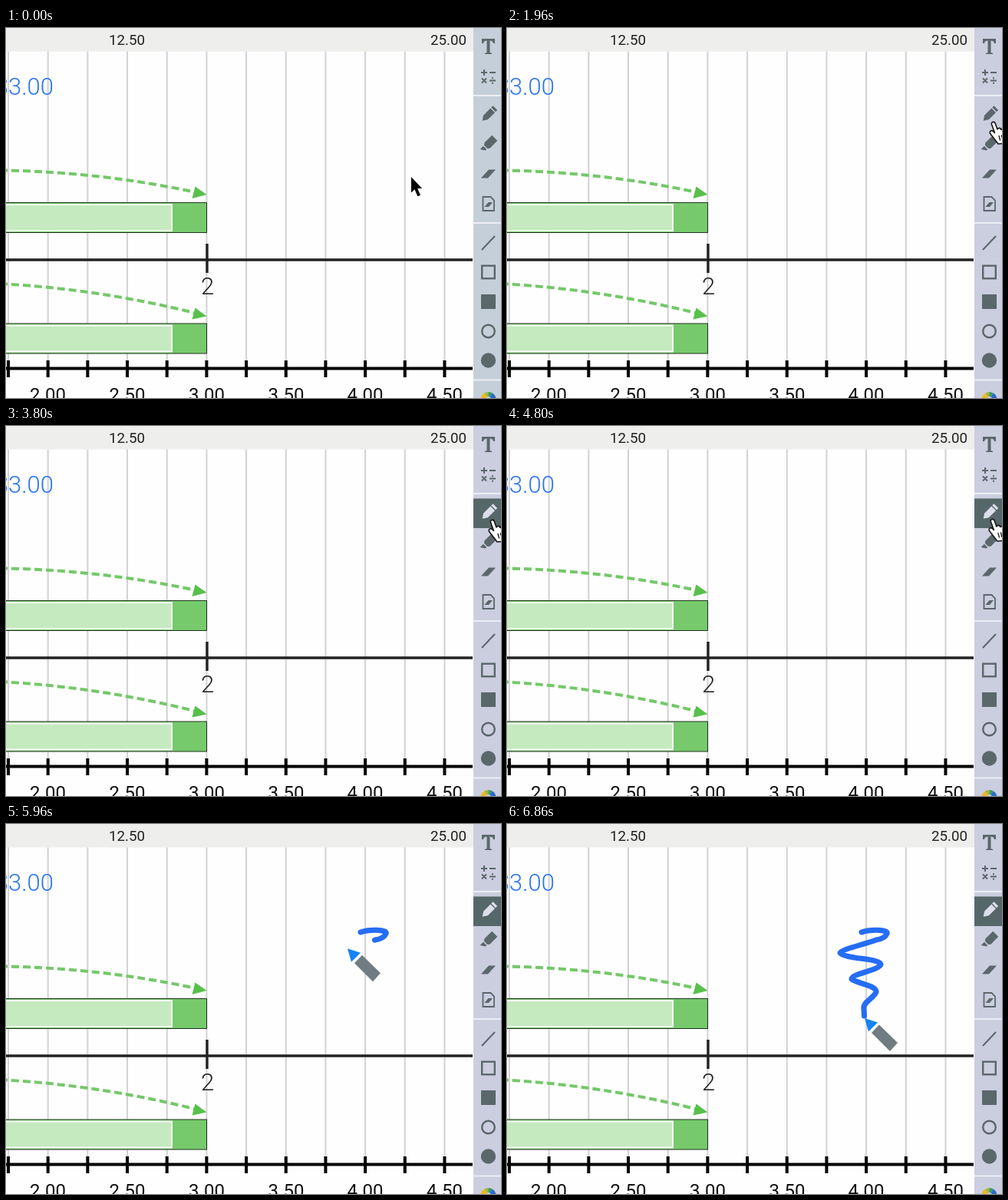
Recreate the animation shown at these times as an HTML page. Size 645 by 482 pixels, loop 8 s.

```html
<!DOCTYPE html>
<html lang="en">
<head>
<meta charset="utf-8">
<title>Number line drawing</title>
<style>
  html, body { margin: 0; width: 100%; height: 100%; overflow: hidden; background: #fefefe; }
  svg { display: block; width: 645px; height: 482px; font-family: Roboto, "Liberation Sans", sans-serif; }
  text { text-anchor: middle; fill: #222; }
  .small { font-size: 18.8px; }
  .axis { font-size: 24px; fill: #111; }
  .big { font-size: 31px; font-weight: 300; }
  .icon { fill: #5a676b; }
  .outline { fill: none; stroke: #5a676b; stroke-width: 2.4; }
  .dash { fill: none; stroke: #74c869; stroke-width: 4; stroke-dasharray: 10 5; }

  /* one 8 s loop: 1% = 80 ms */
  .side, .press, .pencil, .dim, .mover, .arrow, .hand, .approach, .tip, .ink {
    animation: 8s linear infinite;
  }
  .side { animation-name: tint; animation-timing-function: step-end; }
  @keyframes tint { 0% { fill: #c5cfd9; } .75%, 100% { fill: #cbcedf; } }

  .press { animation-name: press; animation-timing-function: step-end; }
  @keyframes press { 0% { opacity: 0; } 30.75%, 100% { opacity: 1; } }

  .pencil { animation-name: light; animation-timing-function: step-end; }
  @keyframes light { 0% { fill: #5a676b; } 30.75%, 100% { fill: #dcdfeb; } }

  .dim { animation-name: dim; animation-timing-function: step-end; }
  @keyframes dim { 0% { opacity: 0; } 30.75% { opacity: .5; } 31.625% { opacity: 1; } 47.5%, 100% { opacity: 0; } }

  .mover { animation-name: move; }
  @keyframes move {
    0% { transform: translate(527px, 192px); }
    12.5% { transform: translate(527px, 192px); animation-timing-function: ease-in-out; }
    24.5%, 58.24% { transform: translate(633px, 123px); }
    58.25%, 60% { transform: translate(632px, 122px); }
    61.25%, 100% { transform: translate(614px, 124px); }
  }
  .arrow { animation-name: arrow; animation-timing-function: step-end; }
  @keyframes arrow { 0% { opacity: 1; } 20.5%, 100% { opacity: 0; } }
  .hand { animation-name: hand; animation-timing-function: step-end; }
  @keyframes hand { 0% { opacity: 0; } 20.5% { opacity: 1; } 61.25%, 100% { opacity: 0; } }

  .approach { animation-name: approach; }
  @keyframes approach {
    0% { transform: translate(170px, -18px); opacity: 0; }
    60% { transform: translate(170px, -18px); opacity: 0; animation-timing-function: cubic-bezier(.4, 0, .7, 1); }
    64.5% { transform: translate(13px, 1px); opacity: 0; animation-timing-function: ease-out; }
    66.25%, 68% { transform: translate(-4px, -1px); opacity: 0; }
    68.5%, 100% { transform: none; opacity: 0; }
  }
  .tip {
    offset-path: path("M462 141C472 137 498 137 495 143C493 148 487 150 481 151C462 158 436 163 434 168C440 176 488 175 487 183C484 191 449 195 449 202C456 208 482 210 481 219C477 228 463 232 465 241L466 253");
    offset-rotate: 0deg;
    animation-name: tip;
  }
  @keyframes tip {
    0%, 68.25% { offset-distance: 0%; }
    74.5% { offset-distance: 32%; }
    78.25% { offset-distance: 64%; }
    84%, 100% { offset-distance: 100%; }
  }
  .shown { animation: shown 8s step-end infinite; }
  @keyframes shown { 0% { visibility: hidden; } 61.25%, 100% { visibility: visible; } }

  /* the ink trails the pen slightly */
  .ink {
    fill: none; stroke: #256df4; stroke-width: 7; stroke-linecap: round; stroke-linejoin: round;
    stroke-dasharray: 100 200; animation-name: ink;
  }
  @keyframes ink {
    0%, 70% { stroke-dashoffset: 100; }
    74.5% { stroke-dashoffset: 81; }
    76.4% { stroke-dashoffset: 68; }
    80.1% { stroke-dashoffset: 36; }
    85.75%, 100% { stroke-dashoffset: 0; }
  }
  .inked { animation: inked 8s step-end infinite; }
  @keyframes inked { 0% { visibility: hidden; } 70%, 100% { visibility: visible; } }

  /* visibility decides when the pen shows */
  .approach { opacity: 1 !important; }
</style>
</head>
<body>
<svg viewBox="0 0 645 482">
  <defs>
    <radialGradient id="spot" gradientUnits="userSpaceOnUse" cx="633" cy="118" r="73">
      <stop offset=".76" stop-opacity="0"/>
      <stop offset=".87" stop-opacity=".3"/>
      <stop offset="1" stop-opacity=".69"/>
    </radialGradient>
    <g id="bar">
      <rect x="-5" y="227.5" width="266.5" height="39" fill="#76ca6c" stroke="#22331f"/>
      <rect x="-5" y="230" width="221" height="34" fill="#c5eabf" stroke="#fff" stroke-width="2"/>
    </g>
  </defs>

  <rect width="645" height="482" fill="#fefefe"/>
  <rect width="609" height="30.5" fill="#eeeeec"/>
  <path d="M2 237H608" stroke="#d2d2d5" stroke-width="413" stroke-dasharray="2 49.68"/>

  <text class="small" x="157.5" y="21.5">12.50</text>
  <text class="small" x="576.5" y="21.5">25.00</text>
  <text class="big" x="62" y="86.5" style="text-anchor:end;fill:#2873f2">$3.00</text>

  <use href="#bar"/>
  <use href="#bar" y="157.5"/>
  <path class="dash" d="M-8 185.3L0 185.5Q125 188 245 213.5"/>
  <path class="dash" d="M-8 333L0 333.5Q125 341 245 371"/>
  <path d="M261.500 217L246.500 206.500L242.500 222ZM261.500 375.500L246.500 364.500L242.500 379.500Z" fill="#57c04b"/>

  <path d="M0 302H608M262 281V319" stroke="#222" stroke-width="3.4"/>
  <text class="big" x="262.500" y="347">2</text>

  <path d="M0 443.500H608" stroke="#000" stroke-width="4"/>
  <path d="M1 444H608" stroke="#000" stroke-width="22" stroke-dasharray="4 47.68"/>
  <g class="axis-labels">
    <text class="axis" x="54.500" y="486">2.00</text>
    <text class="axis" x="158" y="486">2.50</text>
    <text class="axis" x="261.500" y="486">3.00</text>
    <text class="axis" x="365" y="486">3.50</text>
    <text class="axis" x="468" y="486">4.00</text>
    <text class="axis" x="571.500" y="486">4.50</text>
  </g>

  <!-- toolbar -->
  <rect class="side" x="609" width="36" height="482"/>
  <path d="M609 88H645M609 254H645M609 458.500H645" stroke="#eceef5" stroke-width="2"/>
  <rect class="press" x="609" y="94.500" width="36" height="38.500" fill="#566769"/>

  <path class="icon" d="M620 14H637V20H635Q634.500 16.500 630.500 16.500V31.500Q630.500 32.700 633 32.700V34H624V32.700Q626.500 32.700 626.500 31.500V16.500Q622.500 16.500 622 20H620Z"/>
  <path class="outline" stroke-width="2" style="stroke-width:2" d="M619 58H627M623 54V62M630 58H638M620 65.500L626 71.500M626 65.500L620 71.500M630 68.500H638M634 64.300V66.300M634 70.700V72.700"/>
  <path class="icon pencil" transform="translate(628.500 113) rotate(45)" d="M-4-8H4V5L0 11L-4 5ZM-4-12.500H4V-9.300H-4Z"/>
  <path class="icon" transform="translate(629 151) rotate(45)" d="M-5-11H5V3L3 5.500H-3L-5 3ZM-3 7H3V9L-3 13Z"/>
  <path class="icon" d="M619 195.500L629 184.500H638L628 195.500Z"/>
  <path class="outline" style="stroke-width:1.800" d="M621.500 220H631.500L636 224.500V238H621.500Z"/>
  <path class="icon" d="M623.500 233L628.500 227H634L629 233Z"/>
  <path class="outline" style="stroke-width:2" d="M620 289L637 271"/>
  <rect class="outline" x="620.200" y="309.700" width="16.600" height="16.600"/>
  <rect class="icon" x="619" y="347" width="19" height="19"/>
  <circle class="outline" cx="628.500" cy="395" r="8.300"/>
  <circle class="icon" cx="628.500" cy="433" r="9.700"/>
  <g fill="none" stroke-width="6">
    <path d="M621.500 484A7 7 0 0 1 625 478" stroke="#edb91f"/>
    <path d="M625 478A7 7 0 0 1 628.500 477" stroke="#9fb83a"/>
    <path d="M628.500 477A7 7 0 0 1 632 478" stroke="#3c9a62"/>
    <path d="M632 478A7 7 0 0 1 635.500 484" stroke="#2c69c8"/>
  </g>

  <!-- spotlight -->
  <rect class="dim" width="645" height="482" fill="url(#spot)"/>

  <g class="inked">
    <path class="ink" pathLength="100" d="M462 141C472 137 498 137 495 143C493 148 487 150 481 151C462 158 436 163 434 168C440 176 488 175 487 183C484 191 449 195 449 202C456 208 482 210 481 219C477 228 463 232 465 241L465.500 250"/>
  </g>

  <!-- pointers -->
  <g class="mover">
    <path class="arrow" d="M1 2V22.500L5.500 18.300L9.300 27.300L13 25.700L9.200 17H15.200Z" fill="#000" stroke="#fff" stroke-width="2.600" paint-order="stroke"/>
    <g class="hand" stroke="#111" stroke-width="1.600" stroke-linejoin="round" stroke-linecap="round">
      <path d="M-1.500 2.500C-2.500-.5 2-2 3.200 1.200L6 9C7 6.500 10.500 7 11 9.500C12.500 8 15 8.500 15.500 11C18 10 19.500 11.500 20 14C20.500 18 20 22 18.500 27L7 28C4 24 0 19-3 15C-5 12-2 9 1 12L2.500 13.500Z" fill="#fff"/>
      <path d="M8 17.500L9.500 23M11.500 17L13 22.500" fill="none" stroke-width="1.300"/>
    </g>
  </g>
  <g class="shown">
    <g class="approach">
      <g class="tip">
        <path d="M0 0L17 5.500L5 17.500Z" fill="#1484f7"/>
        <path d="M19 8.500L43 32L33 43L9 19Z" fill="#707c82"/>
      </g>
    </g>
  </g>
</svg>
</body>
</html>
```
